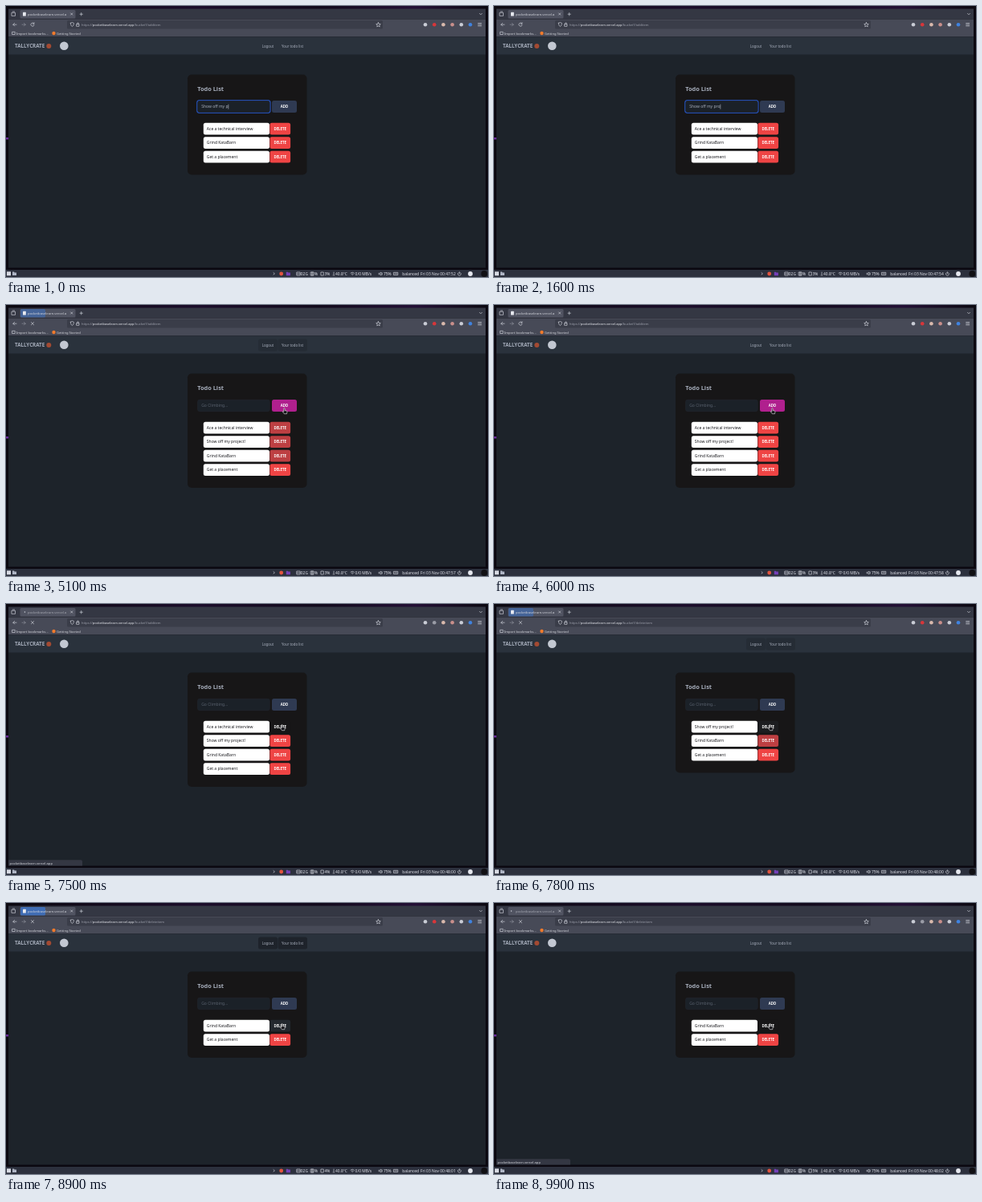
An HTML page for the animation above (10000 ms loop, 600 by 338 pixels).

```html
<!DOCTYPE html>
<html lang="en">
<head>
<meta charset="utf-8">
<title>Todo list demo</title>
<style>
  html, body { margin: 0; width: 100%; height: 100%; overflow: hidden; background: #0b0810; }
  svg { display: block; width: 600px; height: 338px; font-family: "Noto Sans", "Open Sans", sans-serif; }
  text { white-space: pre; }
  .ui { font-size: 4.15px; fill: #d3d5dc; }
  .bar { font-size: 4.9px; fill: #e4e6ee; }
  .body { font-size: 5px; }
  .btn { font-size: 4.375px; font-weight: 700; fill: #fff; text-anchor: middle; }
  .nav { font-size: 4.375px; fill: #a6adbb; }
  .line { fill: none; stroke: #c9ccd5; stroke-width: .7; stroke-linecap: round; stroke-linejoin: round; }
</style>
</head>
<body>
<svg viewBox="0 0 600 338" xmlns="http://www.w3.org/2000/svg">
  <defs>
    <linearGradient id="sky">
      <stop offset="0" stop-color="#0b0810"/><stop offset=".4" stop-color="#1c0d2b"/>
      <stop offset=".65" stop-color="#120a1c"/><stop offset=".85" stop-color="#241036"/>
      <stop offset="1" stop-color="#0b0810"/>
    </linearGradient>
  </defs>
  <rect width="600" height="338" fill="#0b0810"/>
  <rect width="600" height="4" fill="url(#sky)"/>
  <rect y="164" width="3" height="2.5" fill="#6a2a9a"/>

  <!-- browser -->
  <rect x="3" y="3.5" width="594" height="13" fill="#343743"/>
  <rect x="3" y="16.5" width="594" height="22" fill="#474a57"/>
  <rect x="17.5" y="5" width="69" height="10.5" rx="1.5" fill="#505361"/>
  <rect id="burst" x="18" y="5" width="31" height="10.5" rx="1.5" fill="#3978d8"/>
  <rect id="favicon" x="21" y="7.7" width="3.8" height="4.8" rx=".5" fill="#e8eaf0"/>
  <circle id="spinner" cy="10" r=".8" fill="#c9ccd5"/>
  <text id="tab" class="ui" x="27" y="11.6">pocketbaselearn.vercel.a</text>
  <path class="line" d="M80.6 8.9l2.2 2.2m0-2.2l-2.2 2.2M92 10.2h3.4m-1.7-1.7v3.4M7.3 8.3h4.2v4h-4.2zM8.2 7h2.4M589.5 9.3l1.5 1.5 1.5-1.5"/>
  <path class="line" d="M13 23.2H8.8m1.8-1.8l-1.8 1.8 1.8 1.8"/>
  <path class="line" d="M20 23.2h4.2m-1.8-1.8l1.8 1.8-1.8 1.8" opacity=".5"/>
  <path id="reload" class="line" d="M34.8 21.9a2.1 2.1 0 1 0 .3 1.9M35 20.7v1.6h-1.6"/>
  <path id="stop" class="line" d="M31.4 21.6l3.2 3.2m0-3.2l-3.2 3.2"/>
  <rect x="76" y="18" width="393" height="10.5" rx="1.5" fill="#3a3d49"/>
  <path class="line" d="M80.4 21.3l2-.8 2 .8c0 2-.6 3.5-2 4.3-1.4-.8-2-2.3-2-4.3zM88 22.7h3v2.6h-3zm.6 0v-1a.9.9 0 0 1 1.8 0v1"/>
  <text x="94" y="24.7" font-size="4" fill="#9da0ac">https://<tspan fill="#eceef4">pocketbaselearn.vercel.app</tspan><tspan id="path"></tspan></text>
  <path class="line" d="M463.5 20.6l.8 1.8 2 .2-1.5 1.3.4 2-1.7-1-1.7 1 .4-2-1.5-1.3 2-.2z"/>
  <g id="icons"></g>
  <path class="line" d="M587.7 21.5h4m-4 1.7h4m-4 1.7h4"/>
  <path class="line" d="M8 32.3h3.2v3.2H8z"/>
  <text class="ui" x="12.8" y="35.6">Import bookmarks...</text>
  <circle cx="59.5" cy="34" r="2.2" fill="#f07a2c"/>
  <text class="ui" x="63" y="35.6">Getting Started</text>

  <!-- page -->
  <rect x="3" y="38.5" width="594" height="288" fill="#1d232a"/>
  <rect x="3" y="38.5" width="594" height="22" fill="#2a323c"/>
  <text x="11" y="52.2" font-size="6.25" font-weight="700" fill="#a6adbb">TALLYCRATE</text>
  <circle cx="53.3" cy="50" r="3" fill="#a34a32"/>
  <circle cx="72.3" cy="49.8" r="5.3" fill="#c3c8d2"/>
  <g id="pills" fill="#171b21">
    <rect x="314" y="42.5" width="24" height="15" rx="2.5"/>
    <rect x="338.5" y="42.5" width="36.5" height="15" rx="2.5"/>
  </g>
  <text class="nav" x="318.7" y="51.6">Logout</text>
  <text class="nav" x="343" y="51.6">Your todo list</text>

  <rect id="card" x="226" y="85.5" width="148.5" rx="5" fill="#171617"/>
  <text x="238.2" y="106" font-size="7.4" font-weight="600" fill="#a6adbb">Todo List</text>
  <rect id="ring" x="237.9" y="117.7" width="91" height="15.6" rx="3" fill="none" stroke="#2450b8" stroke-width="1.5"/>
  <rect x="238.5" y="118.3" width="89.8" height="14.4" rx="2.4" fill="#1b2128" stroke="#262d36" stroke-width=".4"/>
  <text id="draft" class="body" x="243.2" y="127.3"></text>
  <rect id="caret" y="122.6" width=".5" height="6" fill="#d5dae4"/>
  <rect id="add" x="331" y="118" width="31" height="15" rx="2.5"/>
  <text class="btn" x="346.4" y="127.2">ADD</text>
  <g id="rows"></g>

  <g id="link">
    <path d="M3 319.3h90a2 2 0 0 1 2 2v5.2H3z" fill="#343743"/>
    <text class="ui" x="4.6" y="324.5">pocketbaselearn.vercel.app</text>
  </g>

  <!-- desktop bar -->
  <rect y="329" width="600" height="9" fill="#2c303d"/>
  <rect x="1" y="331.3" width="5" height="5" fill="#d8dbe4"/>
  <path d="M8 331.6h2l.7.8h2.3v3.6H8z" fill="#aeb4c4"/>
  <path class="line" d="M333 332.6l1.4 1.2-1.4 1.2" stroke="#8460b8"/>
  <circle cx="342.7" cy="334" r="2.4" fill="#e2533f"/>
  <path d="M348.8 331.8h2l.7.8h2.4v3.6h-5.1z" fill="#7440b8"/>
  <path class="line" d="M362.2 332h4v4h-4zm0 2h4M379.5 332h3.6v4h-3.6zm1.2 0v4m1.2-4v4M392.3 332h3v4h-3zM408 332v2.5m-.9 1.3h1.8M429 333a3.4 3.4 0 0 1 4.4 0m-3.3 1.3a1.8 1.8 0 0 1 2.2 0m-1.1 1.3v.1M464.5 333.2h1l1.5-1.2v4l-1.5-1.2h-1zm3.7-.3v2.2M482.8 332.3h5v3.2h-5zm1 1.5h3M564.4 331.7v2.2m-1.2-1.3a2 2 0 1 0 2.4 0"/>
  <text class="bar" x="366.8" y="335.8">02G</text>
  <text class="bar" x="384" y="335.8">%</text>
  <text id="load" class="bar" x="396.4" y="335.8"></text>
  <text class="bar" x="410" y="335.8">40.8°C</text>
  <text class="bar" x="434.6" y="335.8">0/0 MB/s</text>
  <text class="bar" x="470" y="335.8">75%</text>
  <text class="bar" x="493.2" y="335.8">balanced</text>
  <text id="clock" class="bar" x="516" y="335.8"></text>
  <circle cx="578" cy="334" r="2.9" fill="#e6e8ef"/>
  <circle cx="595.3" cy="334" r="3.9" fill="#111014"/>

  <path id="hand" d="M-.5 0c0-1 1.2-1 1.2 0v2.3l2.3.6c.7.2.8.6.7 1.2l-.5 2.4H0l-1.9-2.3c-.4-.7.3-1.1.8-.7l.6.5z" fill="#15151a" stroke="#fff" stroke-width=".55"/>
</svg>
<script>
const LOOP = 10000;
const RED = [239, 68, 68], CARD = [23, 22, 23], SLATE = [42, 50, 60];
const NAVY = [47, 58, 82], PINK = [176, 32, 142];
const $ = id => document.getElementById(id);

const ITEMS = ['Ace a technical interview', 'Show off my project!', 'Grind KataBarn', 'Get a placement'];

// [time, text after "Show off my "]
const TYPING = [[0, 'p'], [100, 'pr'], [200, 'prj'], [300, 'prjo'], [700, 'prjoe'], [900, 'prj'],
  [1000, 'pr'], [1100, 'p'], [1200, 'pr'], [1600, 'pro'], [1700, 'proj'], [2100, 'proje'],
  [2200, 'projec'], [2400, 'project'], [2700, 'project!']];

// [click, page swap, loading ends]
const VISITS = [[4200, 4900, 5300], [6800, 7600, 7900], [8200, 8800, 9100], [9500, Infinity, Infinity]];

const ramp = (t, start, length) => Math.min(1, Math.max(0, (t - start) / length));
const ease = k => k * k * (3 - 2 * k);
const mix = (a, b, k) => `rgb(${a.map((v, i) => Math.round(v + (b[i] - v) * k))})`;
const set = (id, attrs) => { for (const k in attrs) $(id).setAttribute(k, attrs[k]); };
const show = (id, on) => set(id, { opacity: +on });
const write = (id, text) => { if ($(id).textContent !== text) $(id).textContent = text; };

$('icons').innerHTML = ['#c9ccd5', '#d8363a', '#d9b9ac', '#c98f8b', '#c9ccd5', '#3f83e0']
  .map((c, i) => `<circle cx="${522 + i * 11.2}" cy="23.3" r="2.3" fill="${c}"/>`).join('');
const shield = $('icons').children[1];

$('rows').innerHTML = ITEMS.map((_, i) => `<g transform="translate(0 ${i * 17.5})">
  <rect x="245.8" y="145.8" width="82.2" height="14.6" rx="2.5" fill="#fff"/>
  <text class="body" x="249.8" y="154.9" fill="#1b1b1f"></text>
  <rect x="328.4" y="145.8" width="25.7" height="14.6" rx="2.5"/>
  <text class="btn" x="341.2" y="154.7">DELETE</text></g>`).join('');
const rows = [...$('rows').children];

function drawBrowser(t, swaps, sinceSwap) {
  const loading = VISITS.some(([a, , c]) => t >= a && t < c);
  const waiting = VISITS.some(([a, b]) => t >= a && t < b);
  show('spinner', waiting);
  set('spinner', { cx: 23 + 1.8 * Math.sin(t / 160) });
  show('favicon', !waiting);
  set('tab', { opacity: waiting ? .65 : 1 });
  set('burst', { opacity: .7 * (1 - ramp(sinceSwap, 100, 300)) });
  show('reload', !loading);
  show('stop', loading);
  show('link', waiting);
  shield.setAttribute('fill', waiting ? '#9a9ca6' : '#d8363a');
  write('path', swaps < 2 ? '/bucket?/additem' : '/bucket?/deleteitem');
}

function drawForm(t, swaps) {
  const fresh = swaps > 0;
  const typed = TYPING.filter(([at]) => at <= t).pop()[1];
  write('draft', fresh ? 'Go Climbing...' : 'Show off my ' + typed);
  set('draft', { fill: fresh ? '#59616d' : '#a6adbb' });
  show('ring', !fresh);
  show('caret', t < 3200);
  if (!fresh) set('caret', { x: 243.3 + $('draft').getComputedTextLength() });
  const hover = ramp(t, 3780, 200) - ramp(t, 6080, 200);
  set('add', { fill: mix(NAVY, PINK, hover) });
}

function drawRows(t, swaps, sinceSwap) {
  const list = swaps === 0 ? ITEMS.filter((_, i) => i !== 1) : ITEMS.slice(swaps - 1);
  const settle = ramp(sinceSwap, 0, 270);
  const hover = ramp(t, 6180, 200);
  rows.forEach((row, i) => {
    row.style.display = i < list.length ? '' : 'none';
    if (i >= list.length) return;
    const [, label, button] = row.children;
    label.textContent = list[i];
    const last = i === list.length - 1;
    const fill = i === 0 && hover > 0
      ? (hover < 1 ? mix(RED, CARD, hover) : mix(SLATE, CARD, settle))
      : mix(SLATE, RED, last ? 1 : settle);
    button.setAttribute('fill', fill);
  });
  set('card', { height: 72.4 + list.length * 17.5 });
  set('pills', { opacity: 1 - settle });
}

function drawHand(t) {
  const a = ease(ramp(t, 3200, 600)), b = ease(ramp(t, 6000, 300));
  const x = 318 + 28.3 * a - 2.8 * b, y = 140 - 10.8 * a + 22 * b;
  set('hand', { transform: `translate(${x} ${y})`, opacity: +(t >= 3200) });
}

function draw(t) {
  const done = VISITS.filter(v => v[1] <= t);
  const sinceSwap = done.length ? t - done[done.length - 1][1] : Infinity;
  drawBrowser(t, done.length, sinceSwap);
  drawForm(t, done.length);
  drawRows(t, done.length, sinceSwap);
  drawHand(t);
  const s = 52 + Math.floor((t + 800) / 1000);
  const pad = n => String(n).padStart(2, '0');
  write('clock', `Fri 03 Nov 00:${47 + Math.floor(s / 60)}:${pad(s % 60)}`);
  write('load', t < 7200 ? '3%' : t < 9200 ? '4%' : '5%');
}

const start = performance.now();
function tick() {
  draw((performance.now() - start) % LOOP);
  requestAnimationFrame(tick);
}
tick();
</script>
</body>
</html>
```
